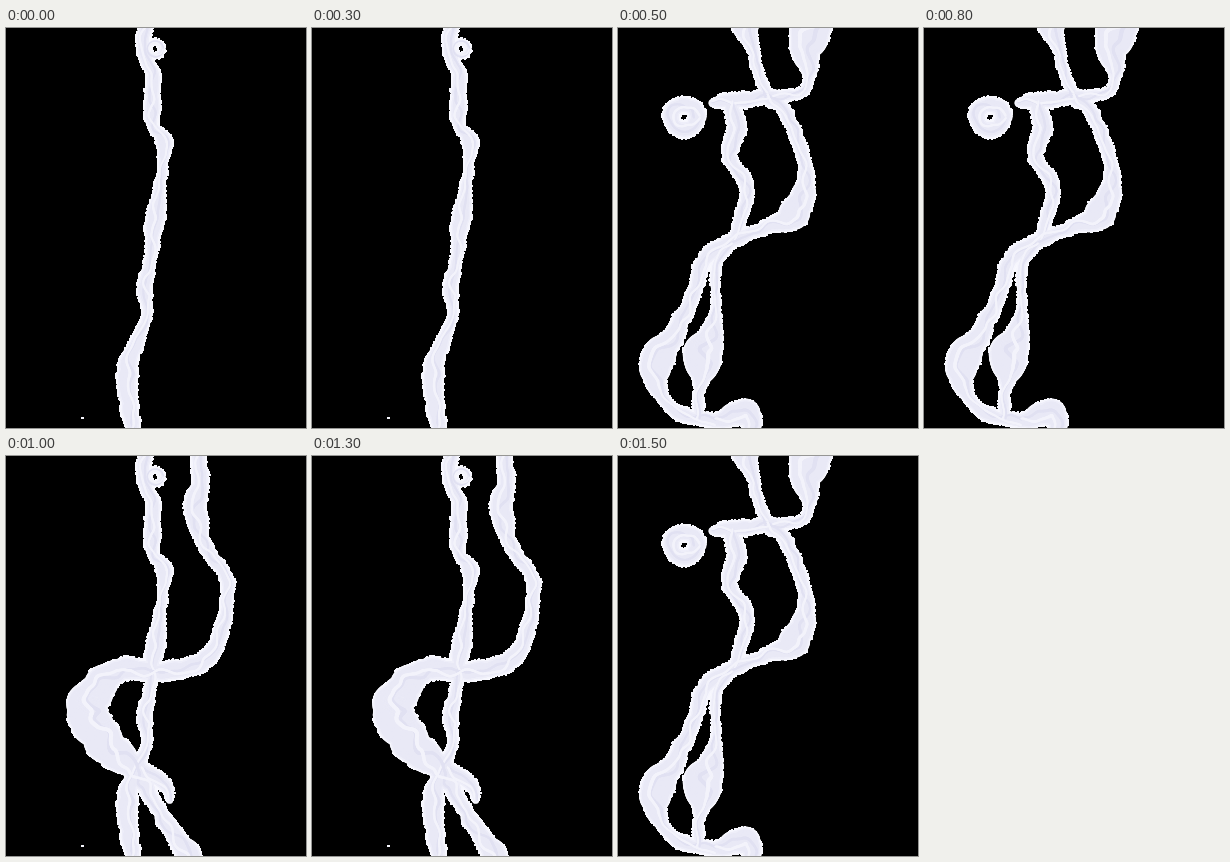
Recreate the animation shown at these times as an HTML page with a canvas. Size 300x400 px, loop 2000 ms.

```html
<!DOCTYPE html>
<html lang="en">
<head>
<meta charset="utf-8">
<title>Lightning</title>
<style>
  html, body { margin: 0; width: 100%; height: 100%; overflow: hidden; background: #000; }
  canvas { position: absolute; left: 0; top: 0; opacity: 0; animation: 2s step-end infinite; }
  #single { animation-name: single; }
  #fork { animation-name: fork; }
  #twin { animation-name: twin; }
  @keyframes single { 0% { opacity: 1; } 25%, 100% { opacity: 0; } }
  @keyframes fork { 0%, 50% { opacity: 0; } 25%, 75%, 100% { opacity: 1; } }
  @keyframes twin { 0%, 75%, 100% { opacity: 0; } 50% { opacity: 1; } }
</style>
</head>
<body>
<canvas id="single" width="300" height="400"></canvas>
<canvas id="fork" width="300" height="400"></canvas>
<canvas id="twin" width="300" height="400"></canvas>
<script>
  const WIDTH = 14;

  function seeded(seed) {
    return () => {
      seed = (seed * 1664525 + 1013904223) >>> 0;
      return seed / 4294967296;
    };
  }

  // Smooth random curve between -1 and 1
  function wobble(seed, period) {
    const rand = seeded(seed);
    const knots = Array.from({ length: 200 }, () => rand() * 2 - 1);
    return s => {
      const i = Math.floor(s / period);
      const t = s / period - i;
      return knots[i] + (knots[i + 1] - knots[i]) * t * t * (3 - 2 * t);
    };
  }

  function spline(a, b, c, d, t) {
    return b + t / 2 * (c - a + t * (2 * a - 5 * b + 4 * c - d + t * (3 * (b - c) + d - a)));
  }

  // Lumpy strand through key points [x, y, width]
  function strand(...keys) {
    const last = keys.length - 1;
    const at = (i, k) => keys[Math.max(0, Math.min(last, i))][k] ?? WIDTH;
    const path = [];
    for (let i = 0; i < last; i++) {
      const steps = Math.ceil(Math.hypot(at(i + 1, 0) - at(i, 0), at(i + 1, 1) - at(i, 1)));
      for (let s = 0; s < steps; s++) {
        const [x, y, w] = [0, 1, 2].map(k =>
          spline(at(i - 1, k), at(i, k), at(i + 1, k), at(i + 2, k), s / steps));
        path.push({ x, y, r: Math.max(2, w / 2) });
      }
    }
    const sway = wobble(path.length, 9);
    const swell = wobble(path.length + 1, 6);
    return path.map((p, i) => {
      const a = path[Math.max(0, i - 3)], b = path[Math.min(path.length - 1, i + 3)];
      const len = Math.hypot(b.x - a.x, b.y - a.y) || 1;
      const nx = (a.y - b.y) / len, ny = (b.x - a.x) / len;
      const shift = sway(i) * p.r * 0.14;
      return { x: p.x + nx * shift, y: p.y + ny * shift, r: p.r * (1 + swell(i) * 0.1), nx, ny };
    });
  }

  function loop(x, y, radius, width) {
    const keys = Array.from({ length: 9 }, (_, i) => {
      const a = i * Math.PI / 4;
      return [x + radius * Math.cos(a), y + radius * Math.sin(a), width];
    });
    return strand(...keys);
  }

  function discs(g, path, inset, color) {
    g.fillStyle = color;
    for (const p of path) {
      g.beginPath();
      g.arc(p.x, p.y, Math.max(0.8, p.r - inset), 0, 7);
      g.fill();
    }
  }

  // Ragged crumbs along both sides
  function fray(g, path) {
    const rand = seeded(path.length * 97);
    g.fillStyle = '#f8f8fe';
    for (const p of path) {
      for (const side of [-1, 1]) {
        const d = side * (p.r - 1 + rand() * 1.6);
        g.fillRect(Math.round(p.x + p.nx * d - 1), Math.round(p.y + p.ny * d - 1), 2, 2);
      }
    }
  }

  function streak(g, path, seed, color) {
    const drift = wobble(seed, 16);
    const spot = i => {
      const p = path[i];
      const d = p.r * 0.6 * drift(i);
      return [p.x + p.nx * d, p.y + p.ny * d];
    };
    g.strokeStyle = color;
    g.lineCap = 'round';
    for (let i = 1; i < path.length; i++) {
      g.lineWidth = 0.8 + path[i].r * 0.16;
      g.beginPath();
      g.moveTo(...spot(i - 1));
      g.lineTo(...spot(i));
      g.stroke();
    }
  }

  function draw(id, paths) {
    const g = document.getElementById(id).getContext('2d');
    paths.forEach(p => fray(g, p));
    paths.forEach(p => discs(g, p, 0, '#f6f6fd'));
    paths.forEach(p => discs(g, p, 1.5, '#eeeef9'));
    paths.forEach(p => discs(g, p, 3, '#e9e9f6'));
    paths.forEach(p => {
      streak(g, p, 11, '#e1e1f2');
      streak(g, p, 29, '#f3f3fb');
    });
    return g;
  }

  function spark(g) {
    g.fillStyle = '#f6f6fd';
    g.fillRect(75, 389, 3, 2);
  }

  const stem = [
    strand([140, -6], [138, 22], [147, 48], [146, 78, 16], [148, 100, 11], [158, 114, 16],
      [156, 145, 9], [149, 188, 19], [145, 225, 12], [139, 260], [140, 290, 10],
      [122, 342, 20], [127, 406]),
    loop(149, 21, 7, 7)
  ];

  const arc = [
    strand([193, -6], [194, 28, 17], [190, 55, 22], [200, 90], [221, 125], [217, 168],
      [198, 205, 19], [150, 216, 19], [112, 215, 25], [82, 250, 38], [98, 286, 36],
      [130, 315, 25], [150, 350], [188, 408, 26]),
    strand([134, 314, 18], [160, 330], [164, 345, 6])
  ];

  const fork = [
    strand([126, -6, 28], [134, 16], [138, 36, 11], [150, 70, 11]),
    strand([194, -6, 42], [188, 18, 32], [191, 45], [184, 64, 10], [148, 69], [112, 73, 16], [94, 75, 8]),
    strand([112, 74], [118, 98, 21], [112, 130], [129, 162], [115, 212, 10]),
    strand([148, 68], [168, 86], [187, 140], [178, 183, 29], [150, 198], [92, 225, 16],
      [77, 262], [56, 306, 20], [40, 333, 32], [42, 366], [65, 387], [98, 393]),
    strand([112, 214], [98, 238, 10], [97, 285, 11], [86, 326, 37], [82, 355], [80, 391, 11]),
    strand([98, 393], [118, 387, 24], [130, 385, 26], [133, 400, 18]),
    loop(66, 89, 13, 17)
  ];

  spark(draw('single', stem));
  draw('fork', fork);
  spark(draw('twin', [...stem, ...arc]));
</script>
</body>
</html>
```
